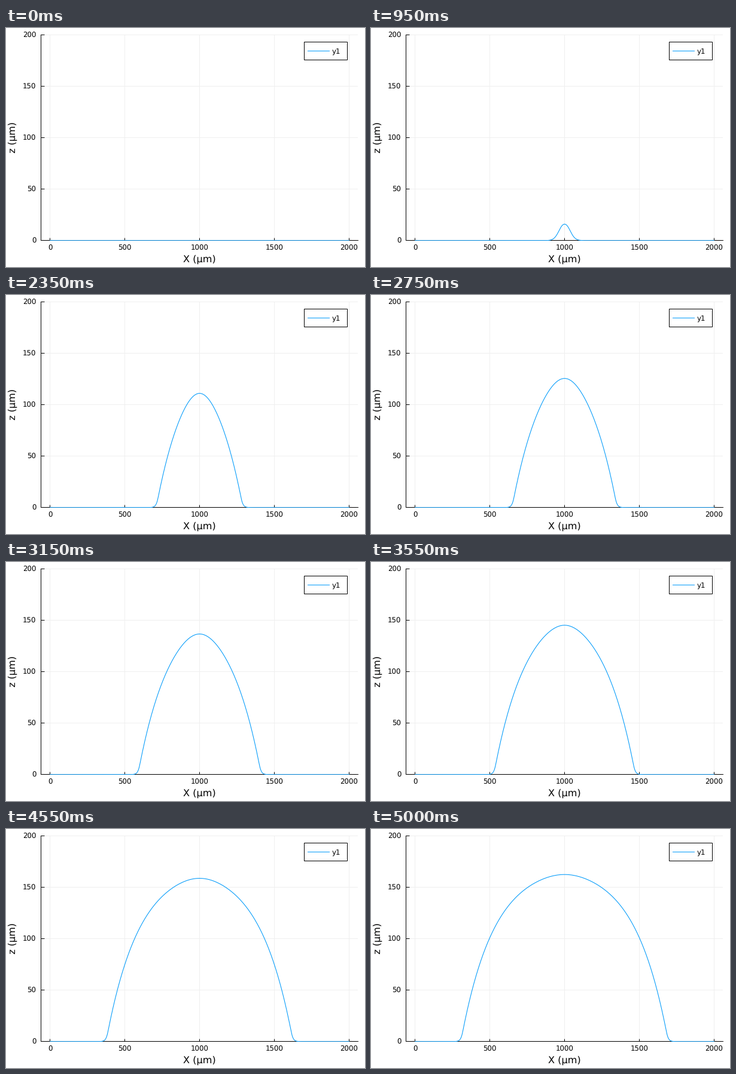
A matplotlib script for the animation above (5050 ms loop, 600 by 400 pixels).

```python
import numpy as np
import matplotlib.pyplot as plt
from matplotlib.animation import FuncAnimation
from matplotlib.lines import Line2D
from matplotlib.patches import Rectangle
from matplotlib.transforms import Affine2D

plt.rcParams.update({"font.family": "DejaVu Sans", "text.hinting": "none"})

W, H, DPI = 600, 400, 100
PX = 72 / DPI
FRAMES, INTERVAL = 101, 50
BLUE = "#009afa"
TICK, LABEL = 11.75 * PX, 16.1 * PX

# Colony growth: dh/dt = ALPHA * min(h, DEPTH) - BETA * h + DIFF * h''
ALPHA, BETA, DEPTH, DIFF = 0.50, 0.0351, 12.14, 32.0
SEED_T, SEED_H = 17, 7.0      # the thin film is still a Gaussian until here
EDGE, EDGE_H = 728, 0.10      # final half width, measured at this height
STEPS, DX = 20, 3.0


def thin_film(x, t):
    """Point source that grows exponentially while it diffuses."""
    if t == 0:
        return np.zeros_like(x)
    peak = SEED_H * np.sqrt(SEED_T / t) * np.exp((ALPHA - BETA) * (t - SEED_T))
    return peak * np.exp(-x**2 / (4 * DIFF * t))


def grow(h):
    dt = 1 / STEPS
    for _ in range(STEPS):
        bend = np.zeros_like(h)
        bend[1:-1] = (h[2:] - 2 * h[1:-1] + h[:-2]) / DX**2
        h = h + dt * (ALPHA * np.minimum(h, DEPTH) - BETA * h + DIFF * bend)
    return h


def simulate():
    x = np.arange(-1200, 1200 + DX, DX)
    rows = [thin_film(x, t) for t in range(SEED_T + 1)]
    while len(rows) < FRAMES:
        rows.append(grow(rows[-1]))
    right = x >= 0
    edge = np.interp(-EDGE_H, -rows[-1][right], x[right])
    x = x * EDGE / edge
    inside = np.abs(x) <= 1000
    return 1000 + x[inside], np.array(rows)[:, inside]


# Whole-pixel edges, so that axes, ticks and grid snap to single pixels
fig = plt.figure(figsize=(W / DPI, H / DPI), dpi=DPI, facecolor="white")
left, right, top, bottom = 58, 588, 11, 355
ax = fig.add_axes([left / W, 1 - bottom / H, (right - left) / W, (bottom - top) / H])
ax.set(xlim=(-60, 2060), ylim=(0, 200))


def label(x, y, text, size=TICK, ha="center", **kw):
    fig.text(x / W, 1 - y / H, text, size=size, ha=ha, va="baseline", **kw)


x_ticks, y_ticks = range(0, 2001, 500), range(0, 201, 50)
ax.set_xticks(x_ticks)
ax.set_yticks(y_ticks)
ax.tick_params(direction="in", width=PX, labelbottom=False, labelleft=False)
ax.tick_params(axis="x", length=4.2 * PX)
ax.tick_params(axis="y", length=6.4 * PX)
ax.grid(color="#efefef", lw=PX)
ax.set_axisbelow(True)
for side, spine in ax.spines.items():
    spine.set(visible=side in ("left", "bottom"), linewidth=PX)

for v in x_ticks:
    label(73.5 + v / 4, 371.6, str(v))
for v in y_ticks:
    label(50.3, 360.2 - v * (bottom - top) / 200, str(v), ha="right")
label(323.5, 392, "X (μm)", LABEL)
label(16, 183, "z (μm)", LABEL, rotation=90, rotation_mode="anchor")

# Legend
fig.add_artist(Rectangle((498 / W, 1 - 53 / H), 72 / W, 30 / H, fc="white",
                         ec="black", lw=PX, transform=fig.transFigure))
fig.add_artist(Line2D([504 / W, 540 / W], [1 - 38 / H] * 2, color=BLUE, lw=PX))
label(544.9, 43.2, "y1", ha="left")

# The curve lies over the axis line and is cut off just below it
xs, heights = simulate()
curve, = ax.plot(xs, heights[0], color=BLUE, lw=1.05 * PX, zorder=4, snap=False,
                 transform=ax.transData + Affine2D().translate(0.5, -0.7))
curve.set_clip_path(Rectangle((left, H - bottom - 1), right - left + 1,
                              bottom - top + 2, transform=None))


def update(i):
    curve.set_ydata(heights[i])
    return curve,


anim = FuncAnimation(fig, update, frames=FRAMES, interval=INTERVAL,
                     repeat=True, repeat_delay=0)
plt.show()
```
